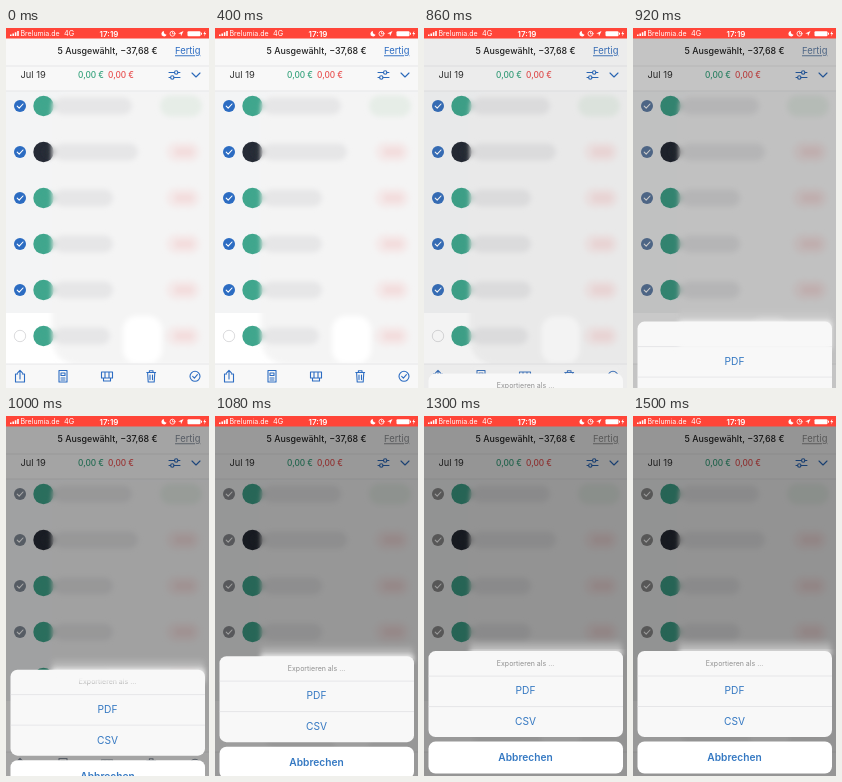
Recreate the animation shown at these times as an HTML page. Size 203 by 360 pixels, loop 1520 ms.

```html
<!DOCTYPE html>
<html lang="de">
<head>
<meta charset="utf-8">
<style>
  html, body { margin: 0; height: 100%; overflow: hidden; background: #f7f7f7; }
  svg { display: block; width: 100vw; height: 100vh; font-family: Inter, Roboto, sans-serif; --tint: rgb(44 108 194); }
  .line { fill: none; stroke-width: 1.1; stroke-linecap: round; stroke-linejoin: round; }
  .tint { stroke: var(--tint); }
  .blue { stroke: #2b69ba; }
  .mid { text-anchor: middle; }
  .sep { stroke: #dadadd; stroke-width: .6; }
</style>
</head>
<body>
<svg viewBox="0 0 203 360" preserveAspectRatio="none">
  <defs>
    <filter id="soft" x="-30%" y="-60%" width="160%" height="220%"><feGaussianBlur stdDeviation="2.6"/></filter>
    <linearGradient id="glowFill" x2="0" y2="1">
      <stop stop-color="#fff" stop-opacity="0"/><stop offset="1" stop-color="#fff" stop-opacity=".6"/>
    </linearGradient>
  </defs>

  <rect width="203" height="360" fill="#f8f8f8"/>
  <path d="M0 38H203" class="sep"/>
  <text x="101.5" y="26.3" class="mid" font-size="8.9" font-weight="500" fill="#222">5 Ausgewählt, −37,68 €</text>
  <text x="169" y="26.3" font-size="9.4" fill="var(--tint)" text-decoration="underline">Fertig</text>
  <text x="14.5" y="50.3" font-size="9.3" fill="#333">Jul 19</text>
  <g font-size="8.3" font-weight="500">
    <text x="72" y="50" fill="#35a27c">0,00 €</text>
    <text x="102" y="50" fill="#e85050">0,00 €</text>
  </g>
  <g class="line blue">
    <path d="M163 44.5h5.5m3.4 0h2M163 49.5h1.6m3.4 0h6"/>
    <circle cx="170.2" cy="44.5" r="1.7"/><circle cx="166.3" cy="49.5" r="1.7"/>
    <path d="M186 45l4 4 4-4"/>
  </g>

  <rect y="63" width="203" height="222" fill="#f3f4f5"/>
  <rect y="285" width="203" height="51" fill="#fff"/>
  <path d="M0 63H203" class="sep"/>
  <g id="rows"></g>
  <path d="M58 66H215V337H70Q47 333 46 310V82Q47 67 58 66Z" fill="#f4f4f4" filter="url(#soft)"/>
  <rect x="117" y="288" width="39" height="48" rx="14" fill="#fff" filter="url(#soft)"/>
  <g id="blobs" filter="url(#soft)"></g>

  <rect y="336" width="203" height="24" fill="#f8f8f8"/>
  <path d="M0 336H203" class="sep"/>
  <g class="line tint">
    <path d="M11.6 346H9.5v8h9v-8h-2.1M14 351v-8.5m-2.4 2.3 2.4-2.4 2.4 2.4"/>
    <path d="M53 342.5h8v11.5h-8zM55 345h4v2.5h-4zM55 350h4M55 352h4"/>
    <path d="M95.5 344h11v6h-11zM99 344v6M103 344v6M97.5 350v3h7v-3"/>
    <path d="M140.8 344.5h8.8M143.4 344.5v-1.8h3.6v1.8M141.6 344.5l.6 9.5h6l.6-9.5M144 347v4.6M146.5 347v4.6"/>
    <circle cx="189" cy="348.3" r="5"/><path d="M186.7 348.4l1.7 1.7 3-3.5"/>
  </g>

  <rect id="dim" y="10" width="203" height="350"/>

  <rect width="203" height="10.5" fill="#ff4538"/>
  <g fill="#fff">
    <path d="M4 6.5h1.6V8H4zM6.4 5.4H8V8H6.4zM8.8 4.2h1.6V8H8.8zM11.2 3h1.6v5h-1.6z"/>
    <g font-size="7">
      <text x="14.5" y="8.3">Brelumia.de</text><text x="58" y="8.3" font-size="7.3">4G</text>
      <text x="103" y="8.5" class="mid" font-size="8" font-weight="600">17:19</text>
    </g>
    <path d="M158 3a2.7 2.7 0 1 0 2.6 3.7A2.7 2.7 0 0 1 158 3ZM177.5 3l-5.3 2.5 2.5.3.3 2.5Z"/>
    <path d="M166.5 4v1.8h1.3" class="line" stroke="#fff" style="stroke-width:.7"/>
    <circle cx="166.5" cy="5.7" r="2.5" class="line" stroke="#fff" style="stroke-width:.8"/>
    <rect x="181.5" y="3.2" width="13" height="5" rx="1"/><rect x="195" y="4.7" width="1" height="2"/>
    <path d="M199.3 2.8l-2 3.2h1.3l-.5 2.4 2.1-3.3h-1.3Z"/>
  </g>

  <rect id="glow" x="46" y="-12" width="152" height="16" fill="url(#glowFill)" filter="url(#soft)"/>
  <g id="sheet" class="mid">
    <rect x="4.5" width="194.5" height="86" rx="7" fill="#f8f8f8"/>
    <path d="M4.5 25H199M4.5 55.5H199" class="sep"/>
    <rect x="4.5" y="90.5" width="194.5" height="32" rx="7" fill="#fff"/>
    <text x="101.5" y="14.6" font-size="7" fill="#909090">Exportieren als ...</text>
    <g font-size="10.2" fill="#3478c2">
      <text x="101.5" y="43">PDF</text><text x="101.5" y="74">CSV</text>
      <text x="101.5" y="110.2" font-weight="600">Abbrechen</text>
    </g>
  </g>
  <rect id="smear" x="46" width="152" fill="#f8f8f8" filter="url(#soft)"/>
</svg>
<script>
const $ = id => document.getElementById(id);
const LOOP = 1520, START = 832, SPEED = 0.02, SMEAR_LAG = 30, COVER_END = 335;
const labelWidths = [78, 84, 59, 59, 59, 56];

const blob = (x, y, w, h, fill) =>
  `<rect x="${x}" y="${y - h / 2}" width="${w}" height="${h}" rx="${h / 2}" fill="${fill}"/>`;

labelWidths.forEach((width, i) => {
  const y = 78 + 46 * i;
  const badge = i === 1 ? '#262b36' : '#40a68d';
  const mark = i < 5
    ? `<circle cx="14" cy="${y}" r="6" fill="var(--tint)"/>
       <path d="M11.2 ${y + .2}l2 2 3.8-4.2" class="line" stroke="#fff"/>`
    : `<circle cx="14" cy="${y}" r="5.7" fill="#fff" stroke="#d2d2d5" stroke-width=".8"/>`;
  $('rows').innerHTML += `${mark}<circle cx="37.5" cy="${y}" r="10.2" fill="${badge}"/>`;
  $('blobs').innerHTML += blob(48, y, width, 17, '#e6e6e7')
    + `<circle cx="43" cy="${y}" r="6" fill="${badge}" opacity=".45"/>`
    + (i ? blob(160, y, 34, 20, '#f4eaea') + blob(168, y, 20, 9, '#f3dddd')
         : blob(154, y, 42, 21, '#e6ede7'));
});

// Critically damped spring, 0 to 1
const spring = ms => {
  const k = Math.max(0, ms) * SPEED;
  return 1 - (1 + k) * Math.exp(-k);
};
const sheetTop = ms => 360 - 125 * spring(ms);

function draw(now) {
  const time = now % LOOP - START;
  const p = spring(time), top = sheetTop(time);
  const smearEnd = Math.min(COVER_END, sheetTop(time - SMEAR_LAG) + 2);
  const mix = (from, to) => from + (to - from) * p;
  $('sheet').setAttribute('transform', `translate(0 ${top})`);
  $('glow').setAttribute('transform', `translate(0 ${top})`);
  $('glow').setAttribute('opacity', p);
  $('smear').setAttribute('y', top);
  $('smear').setAttribute('height', Math.max(0, smearEnd - top));
  $('dim').setAttribute('opacity', 0.4 * p);
  document.querySelector('svg').style.setProperty('--tint',
    `rgb(${mix(44, 145)} ${mix(108, 145)} ${mix(194, 145)})`);
}

const begin = performance.now();
function tick() {
  draw(performance.now() - begin);
  requestAnimationFrame(tick);
}
tick();
</script>
</body>
</html>
```
